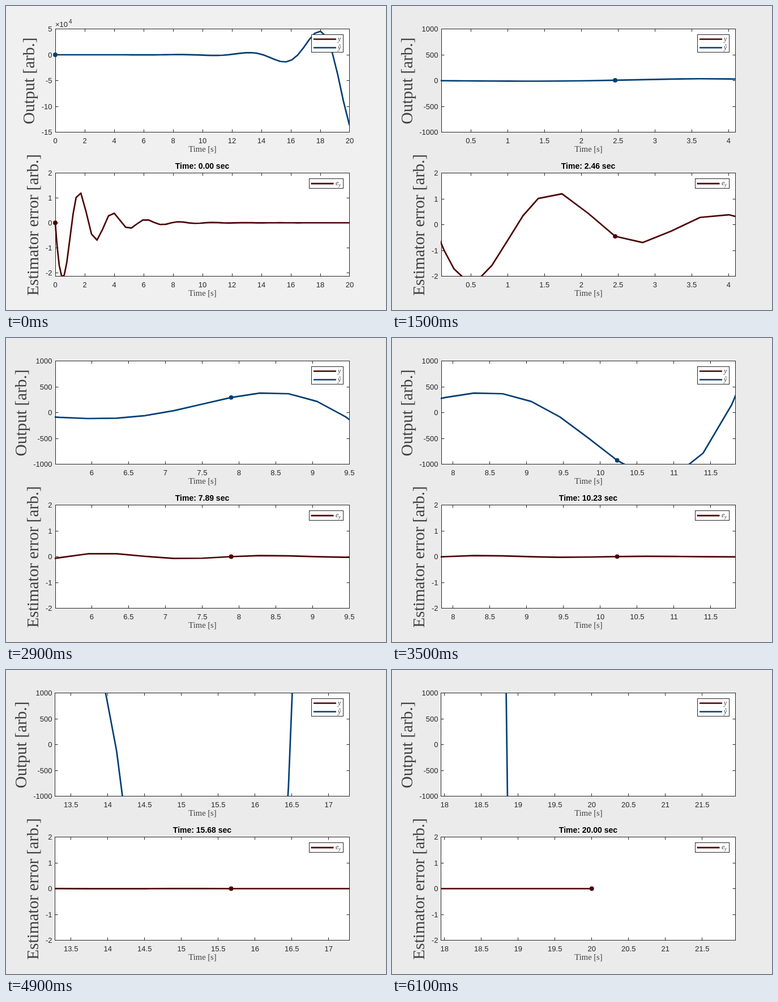
These frames come from a looping animation (671 px wide and 536 px high, 6.2 s). An HTML page:

```html
<!DOCTYPE html>
<html lang="en">
<head>
<meta charset="utf-8">
<title>Output and estimator error</title>
<style>
  html, body { margin: 0; width: 100%; height: 100%; overflow: hidden; background: #ebebeb; }
  svg { display: block; width: 671px; height: 536px; }
  text { fill: #262626; font: 13px "Liberation Sans", Arial, sans-serif; }
  .title { fill: #000; font-size: 14px; font-weight: bold; }
  .serif { font-family: "Liberation Serif", "Times New Roman", serif; fill: #404040; }
  .xlabel { font-size: 14.6px; }
  .ylabel { font-size: 29.3px; }
  .key { font-size: 12px; font-style: italic; }
  .mid { text-anchor: middle; }
  .end { text-anchor: end; }
  .axis { fill: none; stroke: #262626; }
  .box { fill: #fff; stroke: #262626; }
  .curve { fill: none; stroke-width: 2.67; stroke-linejoin: round; }
</style>
</head>
<body>
<svg id="stage" viewBox="0 0 671 536">
  <defs>
    <clipPath id="clipTop"><rect x="86" y="40" width="521" height="183"/></clipPath>
    <clipPath id="clipLow"><rect x="86" y="294" width="521" height="183"/></clipPath>
  </defs>
  <rect id="back" width="671" height="536"/>
  <g id="top"></g>
  <g id="low"></g>
  <g id="legends"></g>
</svg>
<script>
const RED = '#4c0000', BLUE = '#003d73';
const STEP_MS = 100, COUNT = 62;
const LEFT = 87, WIDTH = 520, RIGHT = 606.5, HEIGHT = 182;
const $ = id => document.getElementById(id);

// Solver times: short steps at the start, then a constant step, ending at 20 s.
const times = [0, 0.005, 0.02, 0.045, 0.085, 0.138, 0.269, 0.44, 0.61, 0.785,
  0.995, 1.208, 1.415, 1.738, 2.098, 2.46];
while (times.length < COUNT - 1) times.push(5.17 + 0.3891 * (times.length - 22));
times.push(20);

const output = t => 5.94 * Math.exp(0.5025 * t) * Math.sin(1.3232 * (18.855 - t));
const error = t => -2.87 * Math.exp(-0.5 * t) * Math.sin(2.785 * t);

const line = (x1, y1, x2, y2) => `M${x1} ${y1}L${x2} ${y2}`;
const text = (x, y, cls, str, extra = '') =>
  `<text x="${x}" y="${y}" class="${cls}" ${extra}>${str}</text>`;

function ticks(lo, hi, step) {
  const list = [];
  for (let i = Math.ceil(lo / step - 1e-6); i * step <= hi + 1e-6; i++) list.push(i * step);
  return list;
}

function plot(o) {
  const bottom = o.top + HEIGHT;
  const [x0, x1] = o.xlim, [y0, y1] = o.ylim;
  const px = t => LEFT + (t - x0) / (x1 - x0) * WIDTH;
  const py = v => bottom - (v - y0) / (y1 - y0) * HEIGHT;
  // The left edge snaps to the neighbouring pixel late in the run.
  const edge = x0 < 8 ? 87.5 : 86.5;
  let marks = '', labels = '';

  for (const t of ticks(x0, x1, o.xstep)) {
    const x = Math.min(RIGHT, Math.floor(px(t)) + 0.5);
    marks += line(x, bottom, x, bottom - 5) + line(x, o.top, x, o.top + 5);
    labels += text(px(t), bottom + 19, 'mid', t);
  }
  for (const v of ticks(y0, y1, o.ystep)) {
    const y = Math.floor(py(v)) + 0.5;
    marks += line(edge, y, edge + 5, y) + line(RIGHT, y, RIGHT - 5, y);
    labels += text(81.5, y + 4.5, 'end', v / (o.unit || 1));
  }

  const points = times.map(t => px(t).toFixed(2) + ',' + py(o.fn(t)).toFixed(2)).join(' ');
  const v = o.fn(o.now);
  const dot = v >= y0 && v <= y1
    ? `<circle cx="${px(o.now)}" cy="${py(v)}" r="3.9" fill="${o.color}"/>` : '';
  const mid = o.top + HEIGHT / 2 + 0.5;

  return `<rect x="${edge}" y="${o.top}" width="${RIGHT - edge}" height="${HEIGHT}" class="box"/>` +
    `<path class="axis" d="${marks}"/>${labels}` +
    text(347, bottom + 34.5, 'serif xlabel mid', 'Time [s]') +
    text(0, 0, 'serif ylabel mid', o.label, `transform="translate(${o.labelX} ${mid}) rotate(-90)"`) +
    `<polyline class="curve" clip-path="url(#${o.clip})" stroke="${o.color}" points="${points}"/>` + dot;
}

function draw(k) {
  const first = k === 0, now = times[k];
  const mid = times[Math.max(0, k - 1)];
  const xlim = first ? [0, 20] : [mid - 2, mid + 2];
  const xstep = first ? 2 : 0.5;

  $('back').setAttribute('fill', first ? '#f0f0f0' : '#ebebeb');
  $('top').innerHTML = plot({
    top: 40.5, xlim, xstep, now, fn: output, color: BLUE, clip: 'clipTop',
    ylim: first ? [-150000, 50000] : [-1000, 1000],
    ystep: first ? 50000 : 500, unit: first ? 10000 : 1,
    label: 'Output [arb.]', labelX: first ? 50 : 36
  }) + (first ? text(87, 37, '', '×10') + text(111, 31, '', '4', 'style="font-size:10px"') : '');
  $('low').innerHTML = plot({
    top: 294.5, xlim, xstep, now, fn: error, color: RED, clip: 'clipLow',
    ylim: [first ? -2.148 : -2, 2], ystep: 1,
    label: 'Estimator error [arb.]', labelX: 57.3
  }) + text(346.5, 287, 'title mid', `Time: ${now.toFixed(2)} sec`);
}

const key = (x, y, color) =>
  `<path class="curve" stroke="${color}" d="${line(x, y, x + 40, y)}"/>`;
$('legends').innerHTML =
  '<rect x="539.5" y="50.5" width="56" height="31" class="box"/>' +
  key(543, 58.5, RED) + text(586, 62, 'serif key', 'y') +
  key(543, 73.5, BLUE) + text(586, 77, 'serif key', 'ŷ') +
  '<rect x="535.5" y="304.5" width="60" height="17" class="box"/>' +
  key(538.5, 313.2, RED) + text(582, 316, 'serif key', 'e') +
  text(587, 318, 'serif key', 'y', 'style="font-size:9px"');

let shown = 0;
draw(0);
const start = performance.now();
function tick() {
  const k = Math.floor(Math.max(0, performance.now() - start) / STEP_MS) % COUNT;
  if (k !== shown) draw(shown = k);
  requestAnimationFrame(tick);
}
requestAnimationFrame(tick);
</script>
</body>
</html>
```
